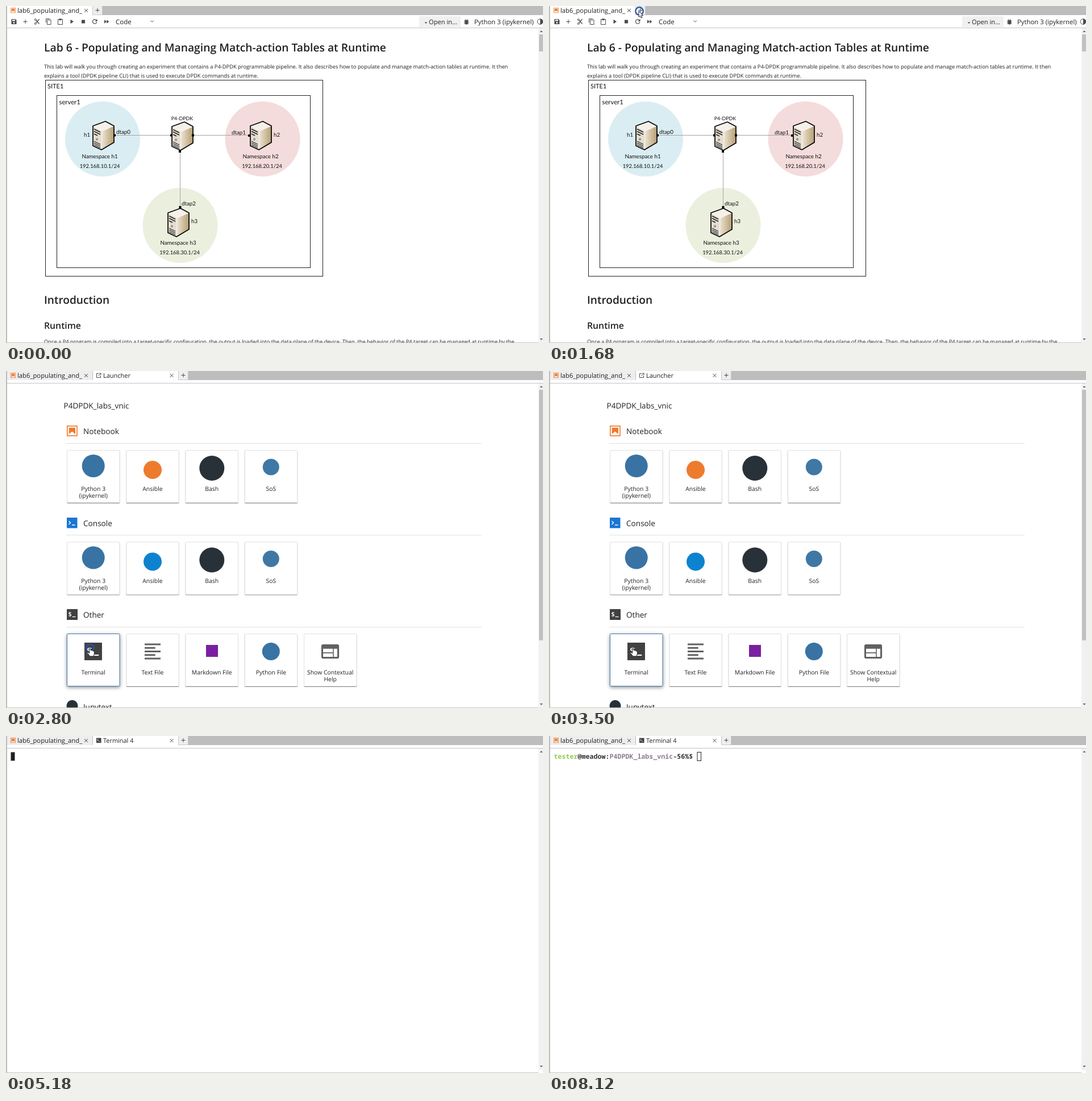
An HTML page that plays this animation: 945 px wide and 593 px high, repeating every 8240 ms.

```html
<!DOCTYPE html>
<html lang="en">
<head>
<meta charset="utf-8">
<title>Notebook to terminal</title>
<style>
html, body { margin: 0; width: 100%; height: 100%; overflow: hidden; background: #fff }
svg { display: block; width: 945px; height: 593px }
text { font-family: "Open Sans", "Noto Sans", sans-serif; fill: #212121; text-rendering: geometricPrecision; white-space: pre }
.d text { font-family: Lato, sans-serif; fill: #111 }
.m text { font-family: "Noto Sans Mono", "DejaVu Sans Mono", monospace; font-weight: 700 }
</style>
</head>
<body>
<svg id="stage" viewBox="0 0 945 593"></svg>
<script>
const LOOP = 8240, STEP = 140;
const OPEN_TAB = 1820, OPEN_TERM = 4060, PROMPT = 6580, BLUR = 8120;
const INK = '#4a4a4a', DARK = '#414141', GREY = '#616161';

const rect = (x, y, w, h, fill, more = '') =>
  `<rect x="${x}" y="${y}" width="${w}" height="${h}" fill="${fill}" ${more}/>`;
const disc = (x, y, r, fill, more = '') =>
  `<circle cx="${x}" cy="${y}" r="${r}" fill="${fill}" ${more}/>`;
const line = (d, color = INK, w = 1, more = '') =>
  `<path d="${d}" fill="none" stroke="${color}" stroke-width="${w}" ${more}/>`;
const shape = (d, fill = INK, more = '') => `<path d="${d}" fill="${fill}" ${more}/>`;
const text = (x, y, s, size, more = '') =>
  `<text x="${x}" y="${y}" font-size="${size}" ${more}>${s}</text>`;
const mid = (x, y, s, size) => text(x, y, s, size, 'text-anchor="middle"');
const group = (id, body, more = '') => `<g id="${id}" ${more}>${body}</g>`;
const at = (x, y, body, scale = 1) =>
  `<g transform="translate(${x} ${y}) scale(${scale})">${body}</g>`;

// Icons
const close = x => line(`M${x - 3} 5l6 6m0 -6l-6 6`);
const plus = (x, y) => line(`M${x - 3.5} ${y}h7m-3.5 -3.5v7`);
const bookIcon = (x, y, s) => at(x, y,
  rect(.8, .8, 16.8, 16.8, 'none', 'stroke="#ee7b2d" stroke-width="1.6"') +
  shape('M3.7 3.7h11v11l-5.5 -4.3l-5.5 4.3z', '#ee7b2d'), s);
const shellIcon = (x, y, s) => at(x, y,
  rect(0, 0, 19, 19, DARK) +
  text(2.5, 13, '$', 11, 'style="fill:#fff" font-weight="600"') +
  line('M9.5 13.5h6', '#fff', 1.3), s);

// Tab bar
const newTab = x => rect(x, 0, 17.5, 15.5, '#eee') +
  line(`M${x + .5} 0v15.5h17v-15.5`, '#c8c8c8') + plus(x + 9, 7.5);
const secondTab = group('tab2',
  rect(2, 0, 151, 16, '#eeeeee') + line('M152.5 0v16', '#bdbdbd') +
  rect(153, 0, 150, 21, '#fff') + close(291.5) + newTab(303) +
  line('M2 21.5H945', '#bfc3c8'));
const tabBar = rect(0, 0, 945, 16, '#bdbdbd') +
  group('tab1', rect(2, 0, 150, 17, '#fff') + newTab(152)) + secondTab +
  bookIcon(8, 3, .5) + text(20, 12.3, 'lab6_populating_and_', 11.25) + close(141);

const arrow = (y, dir) => shape(`M939.5 ${y}h5l-2.5 ${3 * dir}z`, '#606060');
const scrollbar = (top, bottom, thumb = '') =>
  rect(937, top, 8, bottom - top, '#f1f1f1') + arrow(top + 7, -1) + arrow(bottom - 8, 1) + thumb;

// Notebook page
const toolbar =
  shape('M9.5 23h7l2 2v7h-9z') + rect(11, 24, 5, 2.3, '#fff') + disc(14, 29.4, 1.4, '#fff') +
  plus(34, 27.5) +
  line('M51.5 23l7 8.5m0 -8.5l-7 8.5', INK, 1.2) +
  disc(51.7, 24, 1.5, '#fff', `stroke="${INK}"`) + disc(51.7, 31, 1.5, '#fff', `stroke="${INK}"`) +
  line('M70.5 29.5v-7h6.5M72.5 24.5h6.5v8h-6.5z') +
  line('M91.5 23.5h8v9h-8z') + rect(93.5, 22.3, 4, 2.8, INK) +
  shape('M113.5 23.8l5.5 3.7l-5.5 3.7z') + rect(133, 24.5, 6, 6, INK) +
  line('M159 25a3.7 3.7 0 1 0 .8 3.2', INK, 1.2) + shape('M160.5 23v4h-4z') +
  shape('M173 24.3l4 3.2l-4 3.2zM177.3 24.3l4 3.2l-4 3.2z') +
  text(193, 32, 'Code', 11.5) + line('M254.5 25.5l2.7 2.7l2.7 -2.7') +
  rect(727, 18, 73, 19, '#f0f0f0') + shape('M736.5 28.5h5l-2.5 2.5z') +
  text(744, 32, 'Open in...', 11.15) +
  shape('M807.6 25h5.4v6l-2.7 2l-2.7 -2z') +
  line('M806 26h8.6M806 28.5h8.6M806 31h8.6M808 23l1.5 2m3 -2l-1.5 2') +
  text(824, 32, 'Python 3 (ipykernel)', 11.35) +
  disc(940, 27.5, 4.8, '#fff', `stroke="${INK}"`) + shape('M940 22.7a4.8 4.8 0 0 1 0 9.6z') +
  line('M2 38.5H945', '#c4c4c4');

const server = (x, y) => at(x, y,
  shape('M1 9L23 1L38 9L17 18Z', '#f5f1ea') +
  shape('M17 18L38 9V38L16 51Z', 'url(#side)') +
  shape('M1 9L17 18L16 51L1 44Z', '#e4ddd2') +
  line('M3 14.5l11 5.5M3 18.5l11 5.5M3 23l6 3', '#222', 1.5) +
  line('M3 36l11 5.5M3 39l11 5.5M3 42l11 5.5', '#222', 1.2) +
  disc(8, 32.5, 1.5, '#c9bda9', 'stroke="#444" stroke-width=".7"') +
  line('M1 9L17 18L38 9M17 18L16 51', '#fff', .7) +
  line('M1 9L23 1L38 9V38L16 51L1 44Z', '#000', 1.7, 'stroke-linejoin="round"'));
const label = (x, y, n, ipX) =>
  mid(x, y, 'Namespace h' + n, 9.75) + mid(ipX, y + 17, `192.168.${n}0.1/24`, 9.4);
const port = (x, y) => rect(x - 2, y - 2, 4, 4, '#000');

const diagram = '<g class="d">' +
  rect(69.5, 130.5, 488, 345, '#fff', 'stroke="#222"') +
  rect(89.5, 157.5, 446, 303, '#fff', 'stroke="#222"') +
  disc(170, 234, 66, '#daedf3') + disc(451.5, 234, 66, '#f3dcdb') + disc(306.5, 386, 66, '#ebefde') +
  line('M190 227.5H291M329 227.5H428M306.5 255V354', '#a4a4a4') +
  server(152, 202) + server(291, 203) + server(429, 202) + server(284, 355) +
  port(191, 227.5) + port(291, 227.5) + port(329, 227.5) + port(428, 228) +
  port(306, 256) + port(306.5, 354) +
  text(73, 145, 'SITE1', 11) + text(93.5, 173.3, 'server1', 11.3) +
  text(137, 230, 'h1', 9.7) + text(194, 225, 'dtap0', 9.8) +
  mid(310, 201, 'P4-DPDK', 8.9) +
  text(397, 226, 'dtap1', 9.8) + text(471, 230, 'h2', 9.7) +
  text(309, 350.5, 'dtap2', 9.8) + text(326, 382, 'h3', 9.7) +
  label(165, 268, 1, 165) + label(448, 268, 2, 450.5) + label(303, 420, 3, 305.5) + '</g>';

const bold = 'font-weight="600"';
const page = group('page', toolbar +
  text(67, 80, 'Lab 6 - Populating and Managing Match-action Tables at Runtime', 19.3, bold) +
  text(67, 110.3, 'This lab will walk you through creating an experiment that contains a P4-DPDK programmable pipeline. It also describes how to populate and manage match-action tables at runtime. It then', 9.32) +
  text(67, 125.6, 'explains a tool (DPDK pipeline CLI) that is used to execute DPDK commands at runtime.', 9.32) +
  diagram +
  text(67, 524, 'Introduction', 19.1, bold) + text(67, 568.3, 'Runtime', 15.8, bold) +
  text(67, 594.3, 'Once a P4 program is compiled into a target-specific configuration, the output is loaded into the data plane of the device. Then, the behavior of the P4 target can be managed at runtime by the', 9.32) +
  scrollbar(39, 593, rect(938, 50, 7, 30, '#c1c1c1')));

// Launcher
const cardX = i => 107 + i * 104.25;
const cardBox = (x, y, id = '') =>
  rect(x + .5, y + .5, 92.5, 92, '#fff', `${id} rx="1" stroke="#e0e0e0" filter="url(#low)"`);
const card = (i, y, name, id) => cardBox(cardX(i), y, id) +
  name.split('|').map((s, k) => mid(cardX(i) + 46.7, y + 72 + 12 * k, s, 10.4)).join('');
const kernels = (y, accent) =>
  ['Python 3|(ipykernel)', 'Ansible', 'Bash', 'SoS'].map((s, i) => card(i, y, s)).join('') +
  disc(153.7, y + 28, 20, '#3873a4') + disc(258, y + 35, 16, accent) +
  disc(362.3, y + 32, 22, '#293138') + disc(466.3, y + 30, 14.5, '#3f78a5');
const section = (y, name) => text(136, y, name, 13.6) + line(`M106 ${y + 16.3}H837`, '#e0e0e0');
const helpIcon = at(551.8, 474.8, shape(
  'M4 4h16a2 2 0 0 1 2 2v12a2 2 0 0 1 -2 2h-16a2 2 0 0 1 -2 -2v-12a2 2 0 0 1 2 -2z' +
  'M4 9v4h11v-4zM4 14v4h11v-4zM16 9v9h4v-9z', GREY, 'fill-rule="evenodd"'), 1.56);

const launcher = group('launcher',
  shape('M163 4.5h-3.5v7h7v-3.5', 'none', `stroke="${INK}"`) +
  line('M162.5 8.5l4 -4M164 4h3v3') + text(171, 12.3, 'Launcher', 11) +
  text(101.5, 65.7, 'P4DPDK_labs_vnic', 13.55) +
  bookIcon(107, 96, 1.02) + section(111.2, 'Notebook') + kernels(139, '#ee7b2d') +
  rect(107, 258, 18.5, 18.5, '#1976d2') +
  line('M110.5 264l3 3l-3 3M116 271h5.5', '#fff', 1.4) +
  section(272.6, 'Console') + kernels(300.5, '#0d83cf') +
  shellIcon(107, 419, 1) + section(434.4, 'Other') +
  ['Terminal', 'Text File', 'Markdown File', 'Python File', 'Show Contextual|Help']
    .map((s, i) => card(i, 462, s, i ? '' : 'id="hover"')).join('') +
  shellIcon(138, 478, 1.63) +
  line('M244 481h28M244 487.2h18.7M244 493.5h28M244 499.7h18.7M244 506h28', GREY, 3) +
  rect(352, 482, 21, 21, '#7b1fa2') + disc(466.3, 493.5, 15.5, '#3873a4') + helpIcon +
  disc(116.5, 589, 10, '#293138') + text(136, 595.6, 'Jupytext', 13.5) +
  scrollbar(22, 593, rect(938, 33, 7, 441, '#c1c1c1')));

// Terminal
const span = (s, fill) => `<tspan style="fill:${fill}">${s}</tspan>`;
const terminal = group('terminal',
  shellIcon(159, 3.5, .45) + text(171, 12.3, 'Terminal 4', 10.95) +
  group('prompt', text(8.5, 40, span('tester', '#92cb4e') + span('@meadow:', '#333') +
    span('P4DPDK_labs_vnic', '#917a93') + span('-56%$', '#333'), 11.67), 'class="m"') +
  rect(8.5, 28.5, 7, 15, '#231f20', 'id="caret"') + scrollbar(22, 588));

// Mouse pointers, each with its hot spot at 0,0
const pointers =
  group('ring', disc(0, 0, 6.8, 'none', 'stroke="#2650b0" stroke-width="2.2"')) +
  group('arrow', shape('M0 0V10.5L2.5 8.3L4.2 12L6 11.2L4.4 7.6H7.6Z', '#fff', 'stroke="#111" stroke-width=".9"')) +
  group('hand', shape('M-1.2 0Q0 -1.5 1 0V5.5Q3 4.3 3.5 6Q5 5.3 5.6 7Q7.4 6.6 7.4 8.5V12Q6.5 14 6 16H-.5Q-2 13 -4.5 10.5Q-4.8 8 -1.2 10.5Z',
    '#fff', 'stroke="#111" stroke-width=".9"')) +
  group('beam', line('M-2.5 -5.5h5M0 -5.5v11M-2.5 5.5h5', '#333'));

const shadow = (id, dy, blur, alpha) =>
  `<filter id="${id}" x="-15%" y="-15%" width="130%" height="135%">
    <feDropShadow dx="0" dy="${dy}" stdDeviation="${blur}" flood-opacity="${alpha}"/></filter>`;

const stage = document.getElementById('stage');
stage.innerHTML = `<defs>
  <linearGradient id="side"><stop offset="0" stop-color="#eee5d5"/><stop offset="1" stop-color="#b59f72"/></linearGradient>
  ${shadow('low', 1, .7, .45)}${shadow('high', 2, 3, .45)}
  </defs>` + rect(0, 0, 945, 593, '#fff') + tabBar + page + launcher + terminal +
  rect(0, 0, 2, 593, '#bdbdbd') + line('M0 592.5H937', '#c4c4c4') + pointers;

const el = id => document.getElementById(id);
const show = (id, on) => el(id).style.display = on ? '' : 'none';
const clamp = u => Math.max(0, Math.min(1, u));
const ease = u => u * u * (3 - 2 * u);
const mix = (a, b, u) => a + (b - a) * u;

function mouse(t) {
  if (t < OPEN_TAB) {
    const u = ease(clamp((t - 140) / 980));
    return [mix(240, 158, u), mix(600, 9, u)];
  }
  if (t < OPEN_TERM) {
    const u = ease(clamp((t - OPEN_TAB) / 840));
    return [mix(158, 148, u), mix(9, 486, u)];
  }
  return [mix(148, -10, clamp((t - 4760) / 420)), 487];
}

function draw(now) {
  const t = Math.floor(now % LOOP / STEP) * STEP;
  const inTerm = t >= OPEN_TERM, inLauncher = t >= OPEN_TAB && !inTerm;
  show('tab1', t < OPEN_TAB);
  show('tab2', t >= OPEN_TAB);
  show('page', t < OPEN_TAB);
  show('launcher', inLauncher);
  show('terminal', inTerm);

  const prompted = t >= PROMPT, blurred = t >= BLUR;
  const blinkStart = prompted ? PROMPT : t >= 6440 ? 6440 : OPEN_TERM;
  const caret = el('caret');
  show('prompt', prompted);
  show('caret', inTerm && (blurred || Math.floor((t - blinkStart) / 560) % 2 === 0));
  caret.setAttribute('x', prompted ? 261 : 8.5);
  caret.setAttribute('width', prompted ? 6.5 : 7);
  caret.setAttribute('fill', blurred ? '#fff' : '#231f20');
  caret.setAttribute('stroke', blurred ? '#231f20' : 'none');

  const [x, y] = mouse(t);
  const over = inLauncher && y > 462;
  el('hover').setAttribute('stroke', over ? '#3f78ad' : '#e0e0e0');
  el('hover').setAttribute('filter', over ? 'url(#high)' : 'url(#low)');
  for (const id of ['arrow', 'hand', 'beam'])
    el(id).setAttribute('transform', `translate(${x} ${y})`);
  show('arrow', !inTerm && !over);
  show('hand', over);
  show('beam', inTerm && x > -5);

  const first = t >= 1680 && t < 1960;
  show('ring', first || t >= 2800 && t < 3080);
  el('ring').setAttribute('transform', first ? 'translate(159 9)' : 'translate(148 488)');
}

(function tick() {
  draw(performance.now());
  requestAnimationFrame(tick);
})();
</script>
</body>
</html>
```
